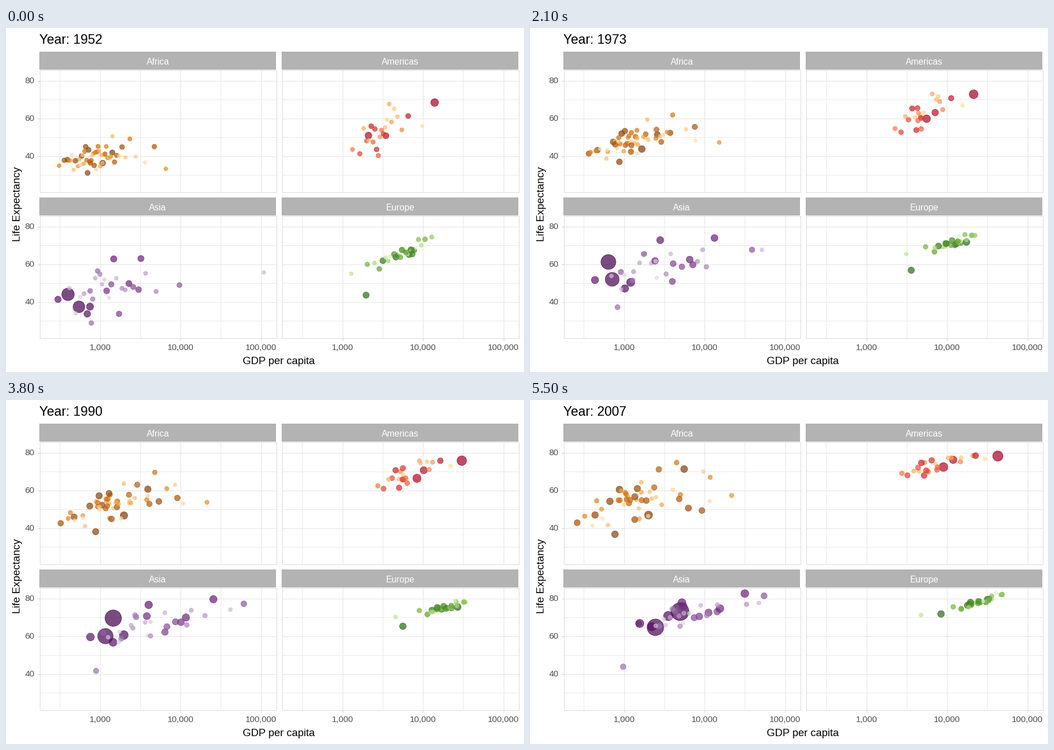
Write a matplotlib script that moves like this. It is 917 px wide and 611 px high and loops after 5.6 s.

```python
import matplotlib.pyplot as plt
import numpy as np
from matplotlib.animation import FuncAnimation
from matplotlib.colors import to_rgb
from matplotlib.patches import Rectangle

W, H, DPI = 917, 611, 64
PT = 72 / DPI  # points per pixel
FIRST, LAST = 1952, 2007
KEY_TIMES = [0, 27 / 55, 1]  # 1952, 1979 and 2007

plt.rcParams["font.family"] = "Liberation Sans"
fig = plt.figure(figsize=(W / DPI, H / DPI), dpi=DPI, facecolor="white")
ax = fig.add_axes([0, 0, 1, 1])
ax.set_xlim(0, W)
ax.set_ylim(H, 0)
ax.axis("off")


def label(x, y, s, px, color="black", **kw):
    kw = {"ha": "center", "va": "baseline", **kw}
    return ax.text(x, y, s, fontsize=px * PT, color=color, **kw)


def line(x0, y0, x1, y1, color):
    ax.plot([x0, x1], [y0, y1], color=color, lw=PT, zorder=1,
            solid_capstyle="butt")


def gdp_x(log_gdp):
    return 166.5 + 142.5 * (log_gdp - 3)


def life_y(life):
    return 160.5 - 3.35 * (life - 60)


def smooth(keys):
    """Coefficients of the parabolas through the three key values."""
    return np.polyfit(KEY_TIMES, keys, 2)


def at(coefs, t):
    return np.array([t * t, t, 1]) @ coefs


class Panel:
    """One continent: a few giants on set paths and a seeded crowd.

    giants: population in millions, then (GDP, life) at the key times
    trend:  at each key time the crowd's mean and spread of log GDP, mean
            life, life gained per unit of wealth, and remaining spread
    """

    def __init__(self, name, col, row, ramp, seed, size, pops, growth, skew,
                 trend, giants):
        self.dx, self.dy = 429 * col, 259 * row
        self.growth, self.skew = growth, skew
        self.trend = smooth(trend)
        paths = np.array([g[1:] for g in giants], float)
        paths[..., 0] = np.log10(paths[..., 0])
        self.log_gdp = smooth(paths[..., 0].T)
        self.life = smooth(paths[..., 1].T)

        # bell-shaped quantiles in random order
        rng = np.random.default_rng(seed)
        u = (np.arange(size) + 0.5) / size
        bell = np.log(u / (1 - u)) / 2
        self.wealth = [rng.permutation(bell) for _ in range(2)]
        self.health = [rng.permutation(bell) for _ in range(2)]
        top, low = pops
        crowd = top * (low / top) ** rng.permutation(u ** 1.4)
        self.pop = np.append([g[0] for g in giants], crowd)

        self.frame(name, col, row)
        rgba = self.colours(ramp)
        self.dots = ax.scatter(self.pop, self.pop, facecolors=rgba,
                               edgecolors=rgba, linewidths=0.88 * PT, zorder=3)

    def colours(self, ramp):
        # the most populous country gets the darkest colour
        rank = np.argsort(np.argsort(-self.pop)) / (len(self.pop) - 1)
        stops = np.array([to_rgb(c) for c in ramp.split()])
        where = np.linspace(0, 1, len(stops))
        rgb = [np.interp(rank, where, stops[:, k]) for k in range(3)]
        return np.column_stack(rgb + [np.full(len(rank), 0.7)])

    def frame(self, name, col, row):
        dx, dy = self.dx, self.dy
        left, right, top, bottom = 59.5 + dx, 478.5 + dx, 74.5 + dy, 291.5 + dy
        for k in range(6):
            x = gdp_x(2.5 + k / 2) + dx
            line(x, top, x, bottom, "#e3e3e3" if k % 2 else "#e8e8e8")
        for life in range(30, 81, 10):
            y = life_y(life) + dy
            line(left, y, right, y, "#e8e8e8" if life % 20 else "#e3e3e3")
        ax.add_patch(Rectangle((left, top), right - left, bottom - top,
                               fill=False, ec="#dadada", lw=PT, zorder=2))
        ax.add_patch(Rectangle((59 + dx, 42.4 + dy), 419.4, 31.6,
                               fc="#b3b3b3", lw=0, zorder=2))
        label(268.7 + dx, 65 + dy, name, 15.8, "white")
        if row:
            for power in (3, 4, 5):
                x = gdp_x(power) + dx
                line(x, bottom, x, bottom + 4, "#cccccc")
                label(x, 571.8, f"{10 ** power:,}", 15.3, "#4d4d4d")
        if not col:
            for life in (40, 60, 80):
                y = life_y(life) + dy
                line(left - 4, y, left, y, "#cccccc")
                label(50.5, y + 4.7, life, 15.3, "#4d4d4d", ha="right")

    def show(self, t):
        gdp, gdp_sd, life, slope, life_sd = at(self.trend, t)
        # each country drifts slowly from one random place to another
        wealth, health = (a * np.cos(turn * t) + b * np.sin(turn * t)
                          for (a, b), turn in ((self.wealth, 0.5),
                                               (self.health, 0.9)))
        bent = wealth + self.skew * (wealth ** 2 - 1)
        x = np.append(at(self.log_gdp, t), gdp + gdp_sd * bent)
        y = np.append(at(self.life, t),
                      life + slope * wealth + life_sd * health)
        self.dots.set_offsets(np.column_stack([gdp_x(x) + self.dx,
                                               life_y(y) + self.dy]))
        pop = self.pop * (self.growth + (1 - self.growth) * t)
        size = 6 + 25.7 * np.sqrt(pop / 1319)
        self.dots.set_sizes((size * PT) ** 2)


panels = [
    Panel("Africa", 0, 0, "#7f3b08 #b35806 #e08214 #fdb863 #fee0b6",
          seed=4, size=49, pops=(77, .2), growth=.27, skew=.15,
          trend=[(2.97, .29, 39.2, 1.8, 4.4),
                 (3.17, .38, 49.8, 4.0, 5.0),
                 (3.20, .45, 54.8, 4.5, 7.8)],
          giants=[(135, (1077, 36.3), (1800, 45.1), (2014, 46.9)),
                  (80, (1419, 41.9), (3020, 54.5), (5581, 71.3)),
                  (44, (4725, 45.0), (8240, 56.5), (9270, 49.3))]),
    Panel("Americas", 1, 0, "#a50026 #d73027 #f46d43 #fdae61 #fee090",
          seed=8, size=22, pops=(44, 1), growth=.4, skew=.1,
          trend=[(3.50, .23, 53.2, 5.0, 6.5),
                 (3.76, .23, 65.0, 4.5, 4.2),
                 (3.88, .30, 73.2, 3.0, 2.4)],
          giants=[(301, (13990, 68.4), (24300, 73.9), (42952, 78.2)),
                  (190, (2109, 50.9), (6730, 62.2), (9066, 72.4)),
                  (109, (3478, 50.8), (8300, 66.0), (11978, 76.2))]),
    Panel("Asia", 0, 1, "#40004b #762a83 #9970ab #c2a5cf #e7d4e8",
          seed=15, size=27, pops=(169, .7), growth=.4, skew=.1,
          trend=[(3.12, .38, 47.0, 4.0, 7.5),
                 (3.52, .52, 61.5, 5.5, 5.5),
                 (3.80, .46, 71.3, 4.5, 3.2)],
          giants=[(1319, (400, 44.0), (817, 64.7), (4959, 73.0)),
                  (1110, (547, 37.4), (824, 55.2), (2452, 64.7)),
                  (224, (750, 37.5), (1420, 54.0), (3541, 70.7)),
                  (127, (3217, 63.0), (17600, 76.2), (31656, 82.6)),
                  (32, (779, 28.8), (850, 39.0), (975, 43.8)),
                  (2.5, (108382, 55.6), (46000, 70.2), (47307, 77.6))]),
    Panel("Europe", 1, 1, "#276419 #4d9221 #7fbc41 #b8e186 #e6f5d0",
          seed=16, size=28, pops=(61, .3), growth=.75, skew=-.12,
          trend=[(3.70, .25, 65.3, 4.3, 1.8),
                 (4.11, .20, 72.6, 1.6, 1.3),
                 (4.36, .24, 77.9, 2.4, 1.0)],
          giants=[(82, (7144, 67.5), (21000, 73.0), (32170, 79.4)),
                  (71, (1969, 43.6), (4240, 60.0), (8458, 71.8))]),
]

title = label(59, 28, "", 23.2, ha="left")
label(483, 596.8, "GDP per capita", 18.7)
label(25.5, 313, "Life Expectancy", 18.9, rotation=90, rotation_mode="anchor")


def draw(i):
    title.set_text(f"Year: {FIRST + i}")
    for panel in panels:
        panel.show(i / (LAST - FIRST))
    return [title] + [panel.dots for panel in panels]


anim = FuncAnimation(fig, draw, frames=LAST - FIRST + 1, interval=100,
                     init_func=lambda: draw(0), repeat=True, repeat_delay=0)
plt.show()
```
